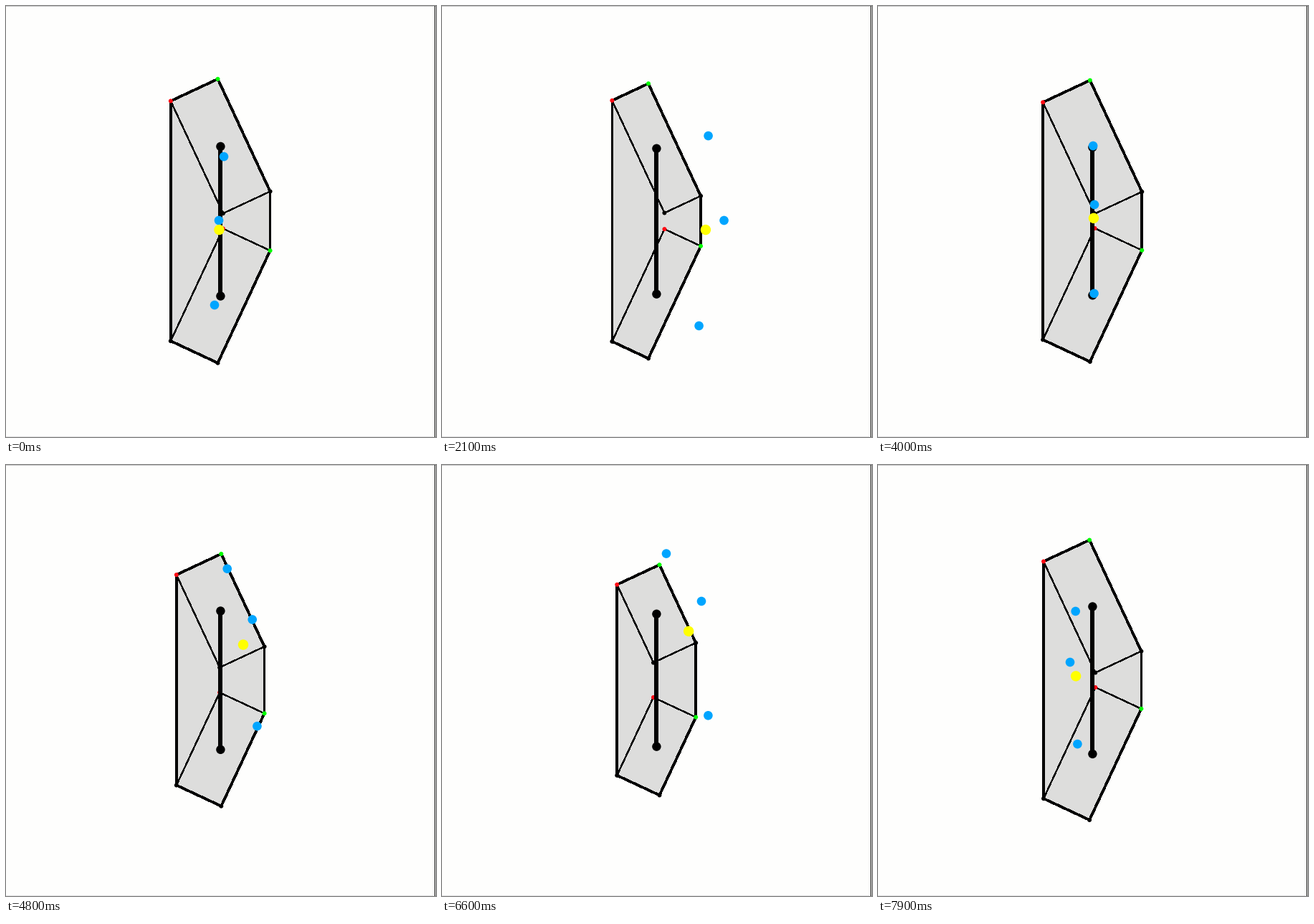
Recreate the animation shown at these times as a matplotlib script. Size 600 px wide and 601 px high, loop 8000 ms.

```python
import numpy as np
import matplotlib.pyplot as plt
from matplotlib.animation import FuncAnimation
from matplotlib.patches import Circle, Polygon

W, H, DPI = 600, 601, 100
FRAMES, STEP = 80, 100
PX = 72 / DPI
CX, CY = 299.2, 299.8
TILT = np.radians(25)
ACROSS = np.array([np.cos(TILT), -np.sin(TILT)])
ALONG = np.array([np.sin(TILT), np.cos(TILT)])

BLACK, RED, GREEN = "#000000", "#ff0a14", "#00ff00"
BLUE, YELLOW, GREY = "#00a5ff", "#ffff00", "#dddddc"

# Stops of the middle blue dot: sway right, rest, reach up, come back
REST = np.array([297, 299])
TIMES = np.array([0, 1920, 3100, 3600, 4000, 4500, 5600, 6100, 6600, 7500, 7900])
STOPS = np.array([REST, (400, 299), REST, REST, (302, 277), (334, 230),
                  (363, 188), (375, 176), (362, 190), (304, 273), (268, 275)])


def slopes():
    """Monotone speeds at the stops, zero at every turning point."""
    d = np.diff(STOPS, axis=0) / np.diff(TIMES)[:, None]
    a, b = d[:-1], d[1:]
    same = a * b > 0
    speed = np.where(same, 2 * a * b / np.where(same, a + b, 1), 0)
    return np.pad(speed, ((1, 1), (0, 0)))


SPEEDS = slopes()


def path(t):
    i = min(np.searchsorted(TIMES, t, side="right") - 1, len(TIMES) - 2)
    h = TIMES[i + 1] - TIMES[i]
    s = (t - TIMES[i]) / h
    ease = s * s * (3 - 2 * s)
    return (STOPS[i] * (1 - ease) + STOPS[i + 1] * ease
            + h * s * (1 - s) * ((1 - s) * SPEEDS[i] - s * SPEEDS[i + 1]))


def pose(t):
    mid = path(t)
    dx, dy = mid - REST
    top = np.array([304 + 0.7 * dx + 0.335 * dy, 210 - 0.3 * dx + 0.614 * dy])
    low = np.array([291 + 0.7 * dx - 0.32 * dy, 417 + 0.3 * dx + 0.8 * dy])
    centre = 0.1 * mid + 0.45 * (top + low)

    # The plates shrink with the square of the offset from rest
    shrink = 0.0035 * (centre[0] - 299) ** 2
    width = 72.5 - shrink
    length = 173 - 0.0048 * (dy + 4) ** 2
    reach = 104.3 - 0.17 * shrink + 0.04 * dy - 0.00053 * dy ** 2

    hub = np.array([CX, CY - reach])
    a, b = ACROSS * width / 2, ALONG * length / 2
    upper = np.array([hub - a - b, hub + a - b, hub + a + b, hub - a + b])
    lower = upper * (1, -1) + (0, 2 * CY)
    return upper, lower, reach, (top, mid, low, centre)


fig = plt.figure(figsize=(W / DPI, H / DPI), dpi=DPI, facecolor="#fefefd")
ax = fig.add_axes([0, 0, 1, 1])
ax.set_xlim(0, W)
ax.set_ylim(H, 0)
ax.axis("off")


def line(width, z, color=BLACK, xs=(), ys=(), cap="round"):
    return ax.plot(xs, ys, color=color, lw=width * PX, zorder=z, snap=False,
                   antialiased=False, solid_capstyle=cap,
                   solid_joinstyle="round")[0]


def dot(radius, color, z):
    return ax.add_patch(Circle((0, 0), radius, fc=color, lw=0, zorder=z))


line(1, 0, "#c8c8c8", (0, W), (0.5, 0.5), "butt")
line(1, 0, "#e4e4e4", (0, W), (600.5, 600.5), "butt")
line(1, 0, BLACK, (598.5, 598.5), (0, H), "butt")

body = ax.add_patch(Polygon(np.zeros((6, 2)), fc=GREY, lw=0, zorder=1))
seams = [line(1.2, 2) for _ in range(2)]
outline = line(2.6, 3)
corners = [dot(3, c, 4) for c in (RED, GREEN, BLACK, BLACK,
                                  BLACK, BLACK, GREEN, RED)]
rod = line(5, 5, cap="butt")
ends = [dot(6.2, BLACK, 5) for _ in range(2)]
marks = [dot(6.3, BLUE, 6) for _ in range(3)] + [dot(7.2, YELLOW, 7)]


def draw(i):
    upper, lower, reach, points = pose(i * STEP)
    hull = np.vstack([upper[:3], lower[2::-1]])
    body.set_xy(hull)
    outline.set_data(*np.vstack([hull, hull[:1]]).T)
    for seam, quad in zip(seams, (upper, lower)):
        seam.set_data(*quad[[0, 3, 2]].T)

    tips = [(299.4, 300.2 - reach), (299.4, 300.2 + reach)]
    rod.set_data(*zip(*tips))
    dots = corners + ends + marks
    for d, p in zip(dots, [*upper, *lower, *tips, *points]):
        d.center = tuple(p)
    return [body, outline, rod, *seams, *dots]


anim = FuncAnimation(fig, draw, frames=FRAMES, interval=STEP,
                     repeat=True, repeat_delay=0)
plt.show()
```
